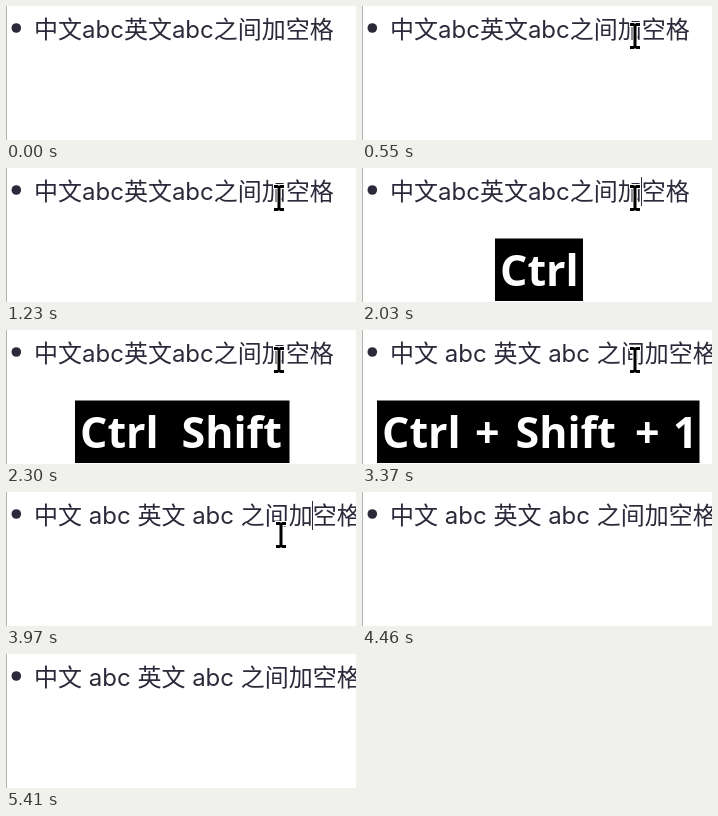
Write an HTML page that moves like this. It is 350x134 px and loops after 5480 ms.

```html
<!DOCTYPE html>
<html lang="zh-CN">
<head>
<meta charset="utf-8">
<title>Spacing between Chinese and Latin text</title>
<style>
html, body { margin: 0; width: 100%; height: 100%; overflow: hidden; background: #fff; }
svg { display: block; width: 350px; height: 134px; }
.line { font: 400 24px Inter, "Noto Sans CJK SC", "Noto Sans CJK", sans-serif; fill: #2c2a3a; }
.keys { font: 700 43px "Open Sans", "Noto Sans", sans-serif; fill: #fff; }
</style>
</head>
<body>
<svg viewBox="0 0 350 134">
  <rect width="350" height="134" fill="#fff"/>
  <rect width="1" height="134" fill="#b4b4b4"/>
  <circle cx="10.3" cy="22" r="4.8" fill="#2c2a3a"/>
  <text id="line" class="line" x="28" y="32"></text>
  <rect id="caret" y="9" width="1" height="29" fill="#2c2a3a"/>
  <g id="pointer">
    <path id="beam" d="M-5-13H-1L0-12L1-13H5V-10H1.5V10H5V13H1L0 12L-1 13H-5V10H-1.5V-10H-5Z"
      fill="#000" stroke="#fff" stroke-width="2" paint-order="stroke"/>
  </g>
  <circle id="click" cx="272" cy="30" r="18" fill="#ff0" fill-opacity=".47"/>
  <g id="keys" class="keys"></g>
</svg>
<script>
const LOOP = 5480;
const $ = id => document.getElementById(id);
const within = (t, a, b) => t >= a && t < b;
const show = (el, on) => el.setAttribute('visibility', on ? 'visible' : 'hidden');

// Key overlays: time span, box edges, words with their x
const overlays = [
  { span: [2030, 2230], box: [133, 221], words: [['Ctrl', 138]] },
  { span: [2230, 2700], box: [69, 283.5], words: [['Ctrl', 74], ['Shift', 175.5]] },
  { span: [2700, 2960], box: [39, 312], words: [['Ctrl', 44], ['Ctrl', 146], ['+', 241], ['...', 270]] },
  { span: [2960, 3570], box: [15, 337.5], words: [['Ctrl', 20], ['+', 113], ['Shift', 153.5], ['+', 273], ['1', 311]] }
];
const caretOn = [[690, 1230], [1760, 2300], [2850, 3370], [3900, 4460], [5010, 5410]];

for (const o of overlays) {
  const [left, right] = o.box;
  o.el = document.createElementNS('http://www.w3.org/2000/svg', 'g');
  o.el.innerHTML = `<rect x="${left}" y="70.5" width="${right - left}" height="62.5" fill="#000"/>` +
    o.words.map(([word, x]) => `<text x="${x}" y="118">${word}</text>`).join('');
  $('keys').append(o.el);
}

// The pointer is sampled in steps, as a screen recorder does
function pointerAt(t) {
  if (t < 70 || t >= 4390) return null;
  if (t < 550) {
    const u = Math.floor((t - 69) / 68.5) / 7;
    const rest = (1 - u) ** 2;
    return [273 + 30 * rest, 30 + 61 * rest];
  }
  if (t < 3830) return [273, 30];
  const step = Math.floor((t - 3830) / 70);
  if (step < 2) return [273, 15 + 13 * step];
  const u = (step - 2) / 5;
  return [275 + 32 * u ** 1.15, 43 + 81 * u];
}

function draw(t) {
  const spaced = t >= 2850;
  const text = spaced ? '中文 abc 英文 abc 之间加空格' : '中文abc英文abc之间加空格';
  if ($('line').textContent !== text) $('line').textContent = text;

  $('caret').setAttribute('x', spaced ? 306 : 279);
  show($('caret'), caretOn.some(([a, b]) => within(t, a, b)));
  show($('click'), within(t, 620, 770));

  const at = pointerAt(t);
  show($('pointer'), at);
  if (at) $('pointer').setAttribute('transform', `translate(${at.map(Math.round)})`);

  for (const o of overlays) show(o.el, within(t, ...o.span));
}

const start = performance.now();
function tick() {
  draw((performance.now() - start) % LOOP);
  requestAnimationFrame(tick);
}
tick();
</script>
</body>
</html>
```
